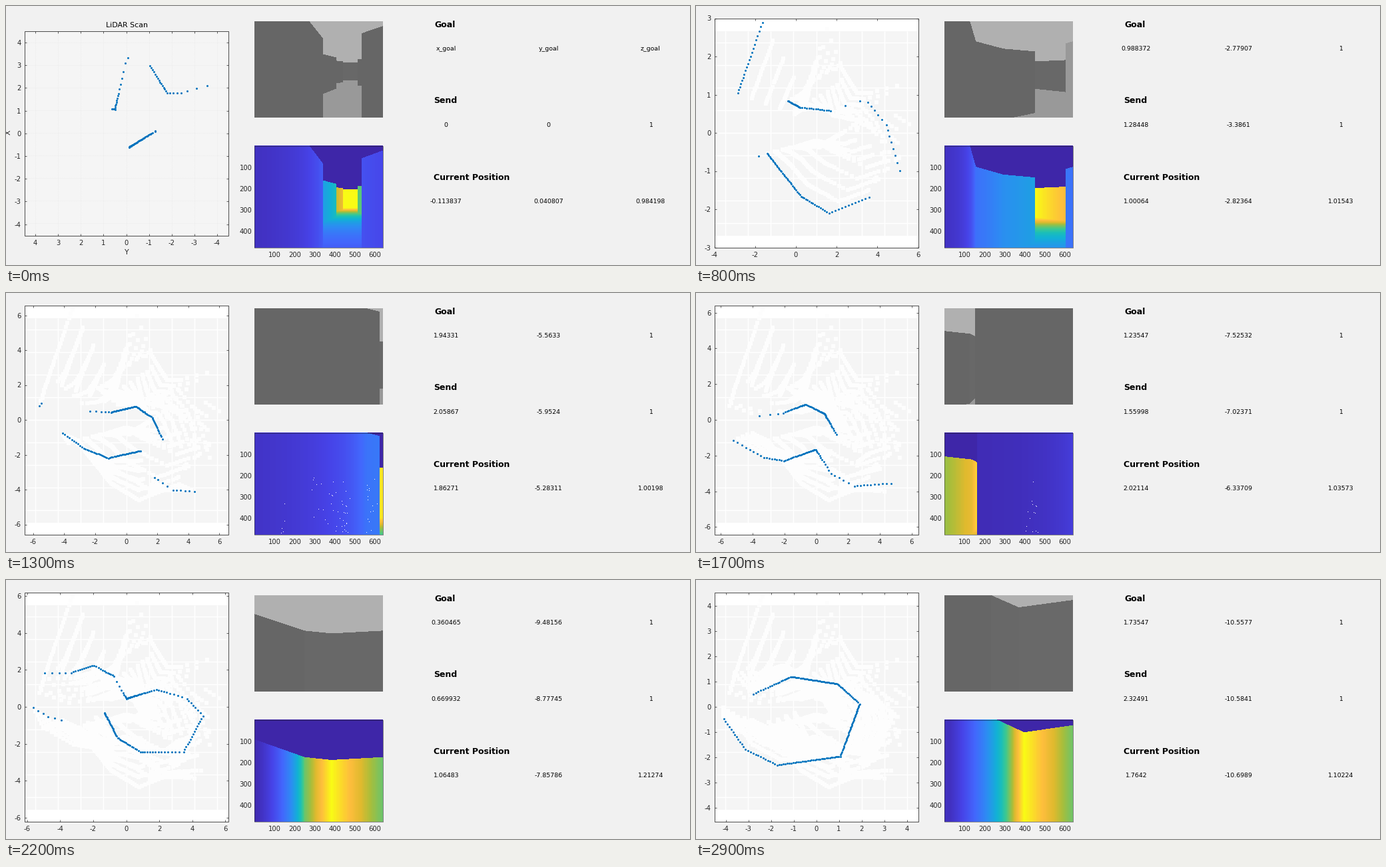
These frames come from a looping animation (1027 px wide and 390 px high, 3.4 s). A matplotlib script:

```python
import numpy as np
import matplotlib.pyplot as plt
from matplotlib.animation import FuncAnimation
from matplotlib.collections import LineCollection
from matplotlib.colors import LinearSegmentedColormap
from matplotlib.patches import Rectangle

W, H, DPI = 1027, 390, 64
PX = 72 / DPI                      # points per pixel
FRAMES, STEP = 34, 100
INK, BLUE, PAGE, HAZE = "#262626", "#0072bd", "#f1f1f1", "#f5f5f5"
LEFT, RIGHT, MID = 27, 333, 190.5  # scan plot
HORIZON, CAM_W, CAM_H = 72, 192, 144
NEAR, FLOOR, CEILING = 0.4, 0.6, 0.69

plt.rcParams["font.family"] = "DejaVu Sans"
parula = LinearSegmentedColormap.from_list("parula", [
    (0, "#3e26a8"), (0.14, "#4743e8"), (0.25, "#4367fd"), (0.375, "#2d8cf3"),
    (0.5, "#12b1d6"), (0.57, "#1bbfb9"), (0.64, "#3fc98f"), (0.75, "#a9be3b"),
    (0.8, "#dfba2e"), (0.87, "#febe3d"), (1, "#f9fb15")])


def chain(x, y, *legs):
    """Dots along a polyline, spaced wider the farther they are from the sensor."""
    dots = [(x, y)]
    for n, x1, y1 in legs:
        p, q = np.array(dots[-1]), np.array((x1, y1))
        reach = [np.hypot(v[0] - 180, v[1] - MID) for v in (p, q)]
        g = (reach[1] / reach[0]) ** 1.5
        u = np.arange(1, n + 1) / n
        t = u if abs(g - 1) < 1e-3 else (g ** u - 1) / (g - 1)
        dots += [tuple(p + s * (q - p)) for s in t]
    return dots


keys = []


def key(at, view, send, pos, cam, edges, walls, *chains):
    """view: zero x, px per unit in x and y; cam: ceiling, floor, low, shift, right shade;
    walls: height above the horizon at both ends of each wall."""
    keys.append(dict(
        at=at, view=np.array(view, float), send=np.array(send, float),
        pos=np.array(pos), cam=np.array(cam, float), edges=np.array(edges, float),
        walls=np.log(np.array(walls, float)), scan=np.array(sum(chains, []), float)))


key(0, (180, -34.1, 34.2), (0, 0, 1), (-0.113837, 0.040807, 0.984198),
    (10, 16, 0, 0, NEAR), (102, 122, 132, 154, 160),
    (174, 47, 23, 18, 13, 12, 10, 10, 15, 15, 54, 65),
    chain(184, 212, (38, 219, 190.5), (1, 223.5, 188), (1, 223.5, 187)),
    chain(301, 119, (1, 285, 123.5), (1, 271, 127.5), (1, 262, 130), (4, 241, 130),
          (14, 215, 89)),
    chain(182, 77, (1, 178.5, 85), (1, 175.5, 98.5), (4, 168.5, 131), (4, 165, 144),
          (4, 163, 155), (3, 158, 154)))
key(4, (180, 23.85, 26.85), (0.688833, -1.99556, 1), (0.365217, -1.17575, 1.05774),
    (12, 26, 0, 0, 0.6), (57, 84, 117, 145, 145),
    (91.5, 41, 28, 23, 23, 21, 12, 13, 13, 13, 26, 39),
    chain(149, 211, (4, 160, 208), (16, 181, 202), (14, 202, 217), (9, 256, 242),
          (6, 288, 232), (1, 299, 231), (1, 304, 228)),
    chain(319, 177, (3, 299, 164)),
    chain(255, 171, (3, 233, 170), (9, 205, 164), (13, 197, 128)),
    chain(196, 34, (1, 190, 61), (4, 176, 110), (26, 147, 162)))
key(8, (149.4, 30.6, 57.5), (1.28448, -3.3861, 1), (1.00064, -2.82364, 1.01543),
    (12, 29, 0, 0, 0.6), (47, 88, 135, 181, 181),
    (200, 42, 42, 31, 31, 27, 12, 14, 14, 14, 39, 42),
    chain(93, 225), chain(106, 221, (32, 157, 286), (15, 199, 311), (12, 259, 287)),
    chain(305, 247, (7, 285, 178), (5, 257, 144), (1, 245, 142), (1, 223, 149)),
    chain(201, 157, (14, 155, 152), (16, 137, 142)),
    chain(99, 24, (19, 62, 130)))
key(13, (180, 23.3, 26.25), (2.05867, -5.9524, 1), (1.86271, -5.28311, 1.00198),
    (21, 46, 0, 0, NEAR), (167, 187, 187, 192, 192),
    (300, 72, 72, 67, 24, 22, 22, 22, 22, 22, 900, 230),
    chain(84, 210, (10, 116, 233), (16, 153, 248), (24, 201, 237)),
    chain(222, 277, (2, 234, 285), (2, 250, 296), (5, 282, 298)),
    chain(234, 219, (14, 219, 187), (18, 194, 170), (26, 157, 179), (5, 125, 177)),
    chain(52, 165, (1, 49, 169)))
key(17, (180, 23.85, 26.9), (1.55998, -7.02371, 1), (2.02114, -6.33709, 1.03573),
    (28, 58, 0, 3, NEAR), (0, 0, 38, 46, 46),
    (300, 72, 72, 67, 38, 34, 34, 30, 30, 30, 900, 230),
    chain(55, 221, (8, 101, 247), (8, 131, 252), (26, 179, 235), (11, 202, 271),
          (5, 237, 290), (10, 292, 286)),
    chain(210, 212, (18, 192, 181), (20, 164, 167), (16, 130, 180), (1, 122, 181),
          (1, 110, 182), (1, 94, 184)))
key(22, (180, 24.8, 27.85), (0.669932, -8.77745, 1), (1.06483, -7.85786, 1.21274),
    (15, 90, 0.33, 0, 0.41), (0, 0, 75, 115, 115),
    (300, 72, 72, 67, 44, 19, 19, 15, 15, 15, 15, 19),
    chain(40, 191, (3, 62, 205), (2, 82, 210)),
    chain(147, 199, (24, 167, 237), (16, 201, 258), (14, 266, 258), (14, 295, 204),
          (7, 271, 178), (9, 225, 164), (28, 180, 178), (8, 161, 144), (11, 131, 128),
          (11, 97, 139), (4, 57, 139)))
key(29, (180, 34, 38.1), (2.32491, -10.5841, 1), (1.7642, -10.6989, 1.10224),
    (54, 400, 0.5, 8, 0.415), (0, 0, 70, 111, 111),
    (300, 72, 72, 67, 102.7, 72, 72, 54, 54, 54, 54, 65),
    chain(41, 208, (12, 73, 254), (13, 121, 278), (36, 216, 265), (40, 245, 186),
          (18, 212, 156), (36, 143, 145), (20, 85, 171)))

# first frame of each waypoint
GOALS = [(0, ("x_goal", "y_goal", "z_goal")), (1, (0.988372, -2.77907, 1)),
         (10, (1.94331, -5.5633, 1)), (15, (1.23547, -7.52532, 1)),
         (21, (0.360465, -9.48156, 1)), (26, (1.73547, -10.5577, 1))]


def state(n):
    """Blend of the two key states around step n."""
    i = max(j for j, k in enumerate(keys) if k["at"] <= n)
    a, b = keys[i], keys[min(i + 1, len(keys) - 1)]
    f = (n - a["at"]) / max(b["at"] - a["at"], 1)
    mix = {k: a[k] + f * (b[k] - a[k]) for k in a if k != "scan"}
    if 0 < n < 4:
        mix["view"] = b["view"]
    m = round((1 - f) * len(a["scan"]) + f * len(b["scan"]))
    pick = lambda s: s[np.linspace(0, len(s) - 1, m).round().astype(int)]
    mix["scan"] = (1 - f) * pick(a["scan"]) + f * pick(b["scan"])
    return mix


states = [state(n) for n in range(30)]


def profile(s, x):
    """Wall height and wall number for each image column."""
    bounds = np.r_[0, s["edges"], CAM_W]
    i = np.clip(np.searchsorted(bounds, x, side="right") - 1, 0, 5)
    h = np.exp(s["walls"]).reshape(6, 2)
    f = (x - bounds[i]) / np.maximum(bounds[i + 1] - bounds[i], 1e-6)
    return h[i, 0] + f * (h[i, 1] - h[i, 0]), i


def pixel_grid(rows, cols=193):
    y = (np.arange(rows) + 0.5) / rows * CAM_H - HORIZON
    return y[:, None], (np.arange(cols) + 0.5) / cols * CAM_W


def grey_view(s):
    y, x = pixel_grid(145)
    h, i = profile(s, x)
    top, base, _, _, right = s["cam"]
    wall = np.array([NEAR, NEAR, NEAR, 0.41, NEAR, right])[i]
    img = np.where(y < -h, CEILING, wall)
    return np.where(y > h * base / top, FLOOR, img)


def depth_view(s):
    y, x = pixel_grid(154)
    top, base, low, shift, _ = s["cam"]
    h, _ = profile(s, np.clip(x - shift, 0, CAM_W))
    d = np.minimum(top / h, np.where(y > 0, base / np.maximum(y, 1e-6), 9))
    return np.where(y < -h, 0, (d - low) / (1 - low))


fig = plt.figure(figsize=(W / DPI, H / DPI), dpi=DPI, facecolor=PAGE)
ax = fig.add_axes([0, 0, 1, 1])
ax.set_axis_off()


def label(x, y, s="", size=10, **kw):
    kw = {"ha": "center", "va": "center_baseline", "color": INK, **kw}
    return ax.text(x, y, s, fontsize=size * PX, **kw)


def rect(x0, y0, x1, y1, **kw):
    return ax.add_patch(Rectangle((x0, y0), x1 - x0, y1 - y0, **kw))


# scan plot
sheet = rect(LEFT, 18, RIGHT, 363, fc="white", lw=0, zorder=1)
rect(LEFT, 37.5, RIGHT, 345, fc=HAZE, lw=0, zorder=2)
grid_at = np.arange(-4, 5) * 34.1
grid = LineCollection(
    [[(180 + g, 37.5), (180 + g, 345)] for g in grid_at]
    + [[(LEFT, 190.5 + g), (RIGHT, 190.5 + g)] for g in grid_at], zorder=3)
ax.add_collection(grid)
trail, = ax.plot([], [], "s", ms=6 * PX, mew=0, color="#fdfdfd", zorder=4)
dots, = ax.plot([], [], "o", ms=3 * PX, mew=0, color=BLUE, zorder=7)
frame = rect(LEFT, 18, RIGHT, 363, fill=False, ec=INK, lw=0.9, zorder=5)
ticks = LineCollection([], colors=INK, linewidths=0.8, zorder=5)
ax.add_collection(ticks)
x_labels = [label(0, 0) for _ in range(15)]
y_labels = [label(22, 0, ha="right") for _ in range(15)]
first_only = [label(180.5, 28, "LiDAR Scan", 11, color="black"), label(181, 370, "Y", 11),
              label(3, 190, "X", 11, rotation=90, va="center")]

# camera views
grey = ax.imshow(grey_view(states[0]), cmap="gray", vmin=0, vmax=1, zorder=2,
                 interpolation="nearest", extent=(372.5, 565.5, 167.5, 22.5))
depth = ax.imshow(depth_view(states[0]), cmap=parula, vmin=0, vmax=1, zorder=2,
                  interpolation="nearest", extent=(372.5, 565.5, 363.5, 209.5))
rect(372.5, 210, 565, 363.5, fill=False, ec=INK, lw=0.6, zorder=3)
for v in range(100, 700, 100):
    label(372.5 + v * 0.3012, 373, v)
for v in range(100, 500, 100):
    label(369, 210 + v * 0.3208, v, ha="right")

rng = np.random.default_rng(4)
cluster = np.r_[np.full(14, 505), rng.choice([417, 462, 485, 512, 546], 46)]
sparks = np.c_[cluster + rng.normal(0, 5, 60), 361 - 85 * rng.random(60) ** 1.4]
spark, = ax.plot([], [], "s", ms=PX, mew=0, color="white", zorder=4)

# readouts
for x, y, s in [(643, 26, "Goal"), (642, 141, "Send"), (641, 256, "Current Position")]:
    label(x, y, s, 12.5, ha="left", weight="bold", color="black")
readouts = [[label(x, y, "", 9.4, color="black") for x in (660, 814, 967)]
            for y in (63, 178, 293)]

ax.set_aspect("auto")
ax.set_xlim(-0.5, W - 0.5)
ax.set_ylim(H - 0.5, -0.5)


def tick_values(lo, hi):
    lo, hi = sorted((lo, hi))
    step = 2 if hi - lo > 9.5 else 1
    return np.arange(np.ceil(lo / step - 0.01), np.floor(hi / step + 0.01) + 1) * step


def draw_axes(view, top, bottom):
    zero, sx, sy = view
    half = (bottom - top) / 2 / sy
    marks = []
    for t in x_labels + y_labels:
        t.set_text("")
    for t, v in zip(x_labels, tick_values((LEFT - zero) / sx, (RIGHT - zero) / sx)):
        x = zero + v * sx
        t.set_text(f"{v:.0f}")
        t.set_position((x, bottom + 10))
        marks += [[(x, top), (x, top + 3)], [(x, bottom), (x, bottom - 3)]]
    for t, v in zip(y_labels, tick_values(-half, half)):
        y = (top + bottom) / 2 - v * sy
        t.set_text(f"{v:.0f}")
        t.set_position((22, y))
        marks += [[(LEFT, y), (LEFT + 3, y)], [(RIGHT, y), (RIGHT - 3, y)]]
    ticks.set_segments(marks)
    frame.set_bounds(LEFT, top, RIGHT - LEFT, bottom - top)


def update(i):
    n = {9: 8, 20: 19}.get(i, min(i, 29))
    s, start = states[n], n == 0
    draw_axes(s["view"], *((37.5, 345) if start else (18, 363)))
    sheet.set_visible(not start)
    for t in first_only:
        t.set_visible(start)
    grid.set(color="#e4e4e4" if start else "white", linewidth=0.8 if start else 1.6,
             linestyle=(0, (1, 2)) if start else "solid")
    dots.set_data(*s["scan"].T)
    past = np.concatenate([np.empty((0, 2))] + [p["scan"] for p in states[:n]])
    trail.set_data(*past.T)
    grey.set_data(grey_view(s))
    depth.set_data(depth_view(s))
    count = 60 if 10 <= n < 16 else 14 if 16 <= n < 19 else 0
    spark.set_data(*sparks[:count].T)
    goal = [g for at, g in GOALS if at <= n][-1]
    for row, values in zip(readouts, (goal, s["send"], s["pos"])):
        for t, v in zip(row, values):
            t.set_text(v if isinstance(v, str) else f"{v:.6g}")


anim = FuncAnimation(fig, update, frames=FRAMES, interval=STEP, repeat=True,
                     repeat_delay=0)
plt.show()
```
